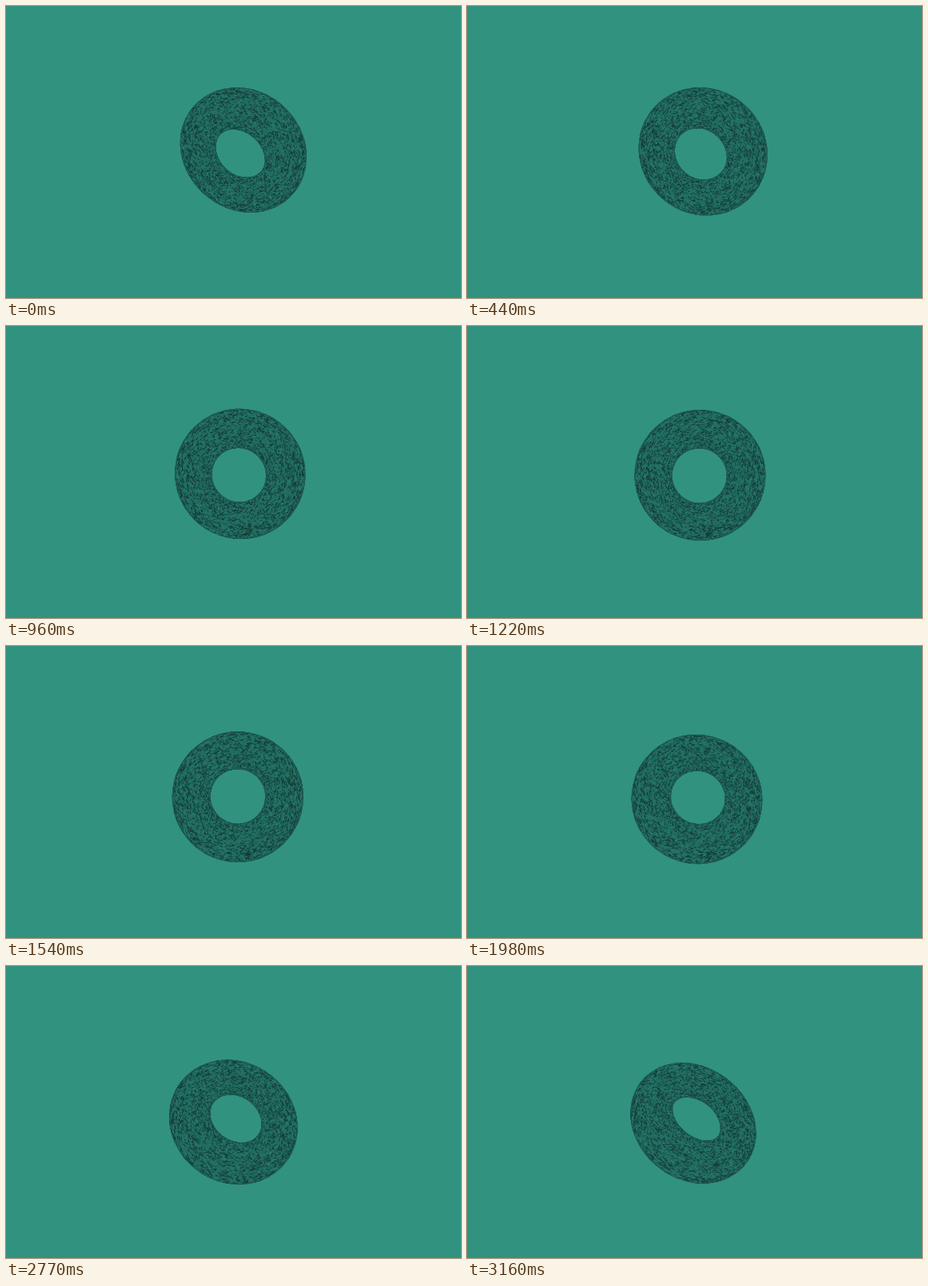
Write an HTML page with a canvas that moves like this. It is 569 by 366 pixels and loops after 3260 ms.

```html
<!DOCTYPE html>
<html>
<head>
<meta charset="utf-8">
<style>
  html, body { margin: 0; width: 100%; height: 100%; overflow: hidden; background: #319280; }
  canvas { display: block; }
</style>
</head>
<body>
<canvas id="stage" width="569" height="366"></canvas>
<script>
const ctx = document.getElementById('stage').getContext('2d');
const LOOP = 3260, TAU = Math.PI * 2;
const RING = 57.6, TUBE = 23.2, DEPTH = 250;

// Uneven redraw times: runs of [first, last, count].
const runs = [[0, 90, 2], [260, 780, 7], [870, 1300, 6], [1420, 1860, 5],
  [1980, 2420, 6], [2510, 2980, 6], [3070, 3160, 2]];
const times = runs.flatMap(([a, b, n]) =>
  Array.from({ length: n }, (_, i) => Math.ceil((a + (b - a) * i / (n - 1)) / 10) * 10));

let seed = 7;
const random = () => (seed = (seed * 16807) % 2147483647) / 2147483647;

// Short strokes lying along the ring on the torus surface.
const makeStrokes = (count, length) => Array.from({ length: count }, () => ({
  u: random() * TAU,
  v: random() * TAU,
  du: length * (0.5 + random()),
  dv: (random() - 0.5) * 0.2
}));
const darkStrokes = makeStrokes(4800, 0.045);
const lightStrokes = makeStrokes(2600, 0.035);

function makePose(seconds) {
  const a = 0.317 * (seconds - 1.36), b = 0.245 * (seconds - 1.5);
  const sa = Math.sin(a), ca = Math.cos(a), sb = Math.sin(b), cb = Math.cos(b);
  const cx = 290 - 2 * sb, cy = 188 + 2 * sa * cb;

  function project(u, v) {
    const radius = RING + TUBE * Math.cos(v);
    const x = radius * Math.cos(u), y = radius * Math.sin(u), z = TUBE * Math.sin(v);
    const z1 = z * cb - x * sb;
    const scale = DEPTH / (DEPTH - y * sa - z1 * ca);
    return [cx + (x * cb + z * sb) * scale, cy + (y * ca - z1 * sa) * scale];
  }

  // Outline point at ring angle u, where the surface turns away from the eye.
  function rim(u, side) {
    const across = DEPTH * (sa * Math.sin(u) - sb * ca * Math.cos(u)) - RING;
    const up = DEPTH * cb * ca;
    return project(u, Math.atan2(up, across) + side * Math.acos(TUBE / Math.hypot(across, up)));
  }
  return { project, rim };
}

function outline(rim) {
  const path = new Path2D();
  for (const side of [-1, 1]) {
    for (let i = 0; i < 120; i++) path.lineTo(...rim(i / 120 * TAU, side));
    path.closePath();
    path.moveTo(...rim(0, 1));
  }
  return path;
}

function drawStrokes(project, strokes, color, width) {
  ctx.beginPath();
  for (const { u, v, du, dv } of strokes) {
    ctx.moveTo(...project(u, v));
    ctx.lineTo(...project(u + du, v + dv));
  }
  ctx.strokeStyle = color;
  ctx.lineWidth = width;
  ctx.stroke();
}

function draw(ms) {
  const { project, rim } = makePose(ms / 1000);
  const shape = outline(rim);
  ctx.fillStyle = '#319280';
  ctx.fillRect(0, 0, 569, 366);
  ctx.fillStyle = '#216c60';
  ctx.fill(shape, 'evenodd');
  ctx.save();
  ctx.clip(shape, 'evenodd');
  drawStrokes(project, darkStrokes, '#143c37', 0.9);
  drawStrokes(project, lightStrokes, '#297e6f', 0.8);
  ctx.strokeStyle = 'rgba(31, 88, 80, 0.7)';
  ctx.lineWidth = 3;
  ctx.stroke(shape);
  ctx.restore();
}

let shown = -1;
function tick() {
  const now = performance.now() % LOOP;
  const time = times.findLast(t => t <= now);
  if (time !== shown) draw(shown = time);
  requestAnimationFrame(tick);
}
tick();
</script>
</body>
</html>
```
